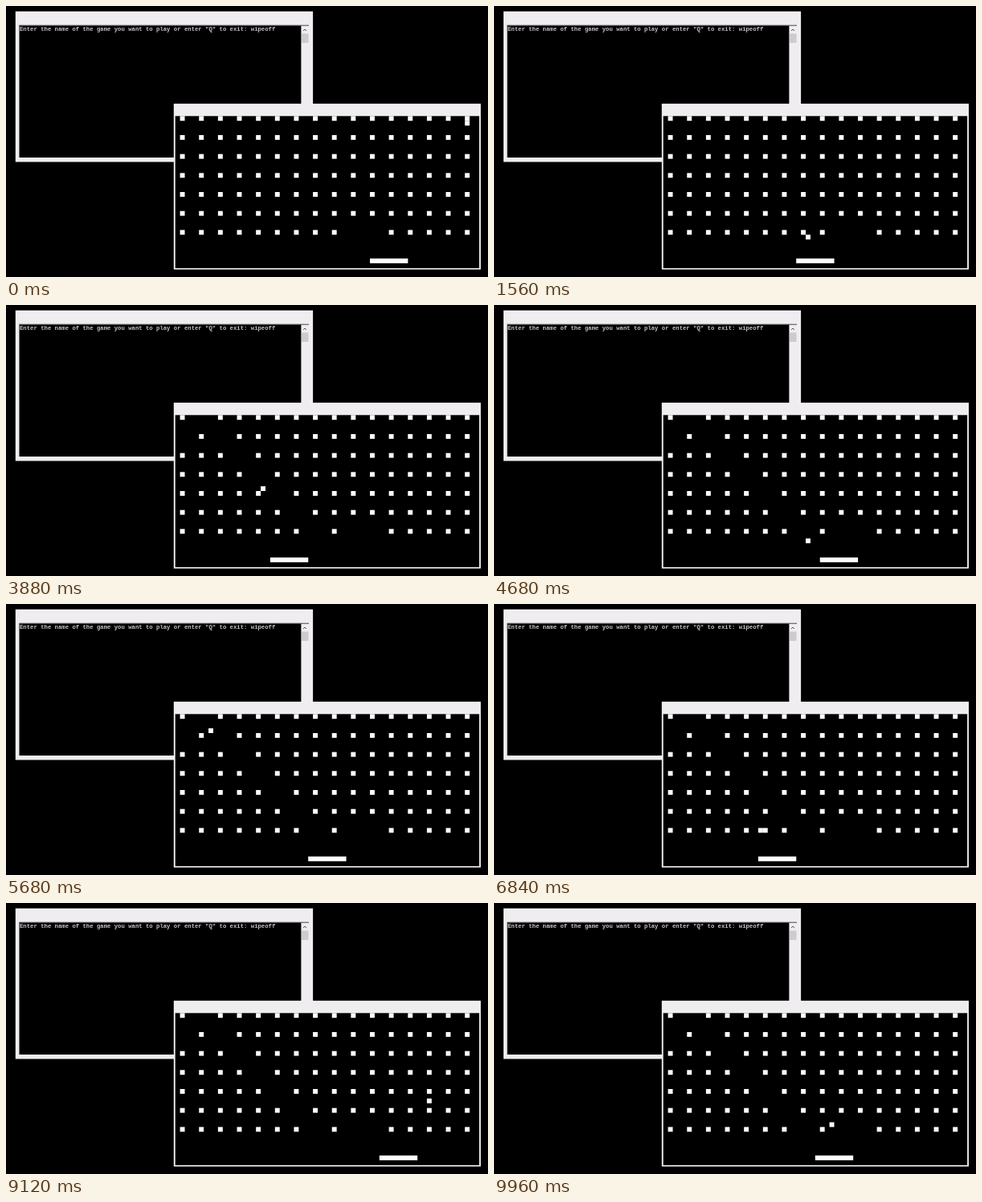
Recreate the animation shown at these times as an HTML page. Size 600 px wide and 338 px high, loop 10000 ms.

```html
<!DOCTYPE html>
<html lang="en">
<head>
<meta charset="utf-8">
<title>Brick game</title>
<style>
  html, body { margin: 0; width: 100%; height: 100%; overflow: hidden; background: #000; }
  svg { display: block; width: 600px; height: 338px; }
  text { font: bold 7.28px "Liberation Mono", monospace; fill: #c4c4c4; white-space: pre; }
</style>
</head>
<body>
<svg viewBox="0 0 600 338">
  <rect width="600" height="338" fill="#000"/>
  <g id="console">
    <rect x="11.8" y="6.7" width="370.3" height="187.8" fill="#f0edf0"/>
    <rect x="16" y="23.6" width="361" height="165.4" fill="#777"/>
    <rect x="17" y="24.6" width="350.5" height="164.4" fill="#000"/>
    <rect x="367.5" y="25" width="9.5" height="164" fill="#f0edf0"/>
    <rect x="368" y="34.5" width="8.5" height="11.5" fill="#cdcbcd"/>
    <path d="M370 31l2-2 2 2" fill="none" stroke="#555"/>
    <text x="17" y="30.6">Enter the name of the game you want to play or enter "Q" to exit: wipeoff</text>
  </g>
  <rect x="208.8" y="121.8" width="382.2" height="206.8" fill="#f0edf0"/>
  <rect x="210.7" y="137.3" width="378.4" height="189.6" fill="#000"/>
  <g id="board" fill="#fff"></g>
</svg>
<script>
const FRAME = 40, LOOP = 10000;
const RATE = 14 / 15;      // ball steps per frame
const PHASE = 0.3;         // step clock at the start
const HIT_PAUSE = 0.75;    // extra steps spent on a broken brick
const PADDLE_ROW = 30;
const CELL = 5.92;

// [frame, column] of the paddle's left end
const paddleKeys = [
  [0, 41], [26, 38], [39, 28], [52, 19], [75, 9], [78, 9], [104, 24],
  [112, 31], [117, 33], [123, 38], [130, 32], [171, 20], [175, 20],
  [182, 26], [206, 44], [214, 48], [234, 41], [240, 40], [249, 32]
];

function paddleAt(frame) {
  const i = paddleKeys.findIndex(k => k[0] > frame);
  if (i < 0) return paddleKeys[paddleKeys.length - 1][1];
  const [f0, c0] = paddleKeys[i - 1], [f1, c1] = paddleKeys[i];
  return Math.round(c0 + (c1 - c0) * (frame - f0) / (f1 - f0));
}

const board = document.getElementById('board');

function addCells(col, row, count = 1) {
  const r = document.createElementNS('http://www.w3.org/2000/svg', 'rect');
  r.setAttribute('width', count * CELL);
  r.setAttribute('height', CELL);
  place(r, col, row);
  return board.appendChild(r);
}

function place(r, col, row) {
  r.setAttribute('x', 210.7 + col * 5.91);
  r.setAttribute('y', 137.3 + row * CELL);
}

const bricks = new Map();
for (let row = 0; row <= 24; row += 4)
  for (let col = 1; col < 64; col += 4)
    if (row < 24 || (col !== 37 && col !== 41))
      bricks.set(col + ',' + row, { node: addCells(col, row), gone: Infinity });

const paddle = addCells(41, PADDLE_ROW, 8);
const ball = addCells(61, 1);

// Play the game once and keep the ball's path on the step clock
const path = [];
let x = 61, y = 1, dx = 1, dy = -1, clock = 0;
const end = PHASE + LOOP / FRAME * RATE;
while (clock <= end) {
  path.push({ clock, x, y });
  const brick = bricks.get(x + ',' + y);
  if (brick && brick.gone === Infinity) {
    brick.gone = clock;
    dy = -1;
    clock += HIT_PAUSE;
  }
  if (x === 0) dx = 1;
  if (x === 63) dx = -1;
  if (y === 0) dy = 1;
  if (y === PADDLE_ROW) {
    dx = x - paddleAt((clock - PHASE) / RATE) < 4 ? -1 : 1;
    dy = -1;
  } else {
    x += dx;
  }
  y += dy;
  clock++;
}

function draw(ms) {
  const frame = Math.floor(ms % LOOP / FRAME);
  const now = PHASE + frame * RATE;
  let i = path.length - 1;
  while (path[i].clock > now) i--;
  place(ball, path[i].x, path[i].y);
  place(paddle, paddleAt(frame), PADDLE_ROW);
  for (const b of bricks.values())
    b.node.setAttribute('visibility', b.gone <= now ? 'hidden' : 'visible');
}

const start = performance.now();
function tick() {
  draw(performance.now() - start);
  requestAnimationFrame(tick);
}
tick();
</script>
</body>
</html>
```
